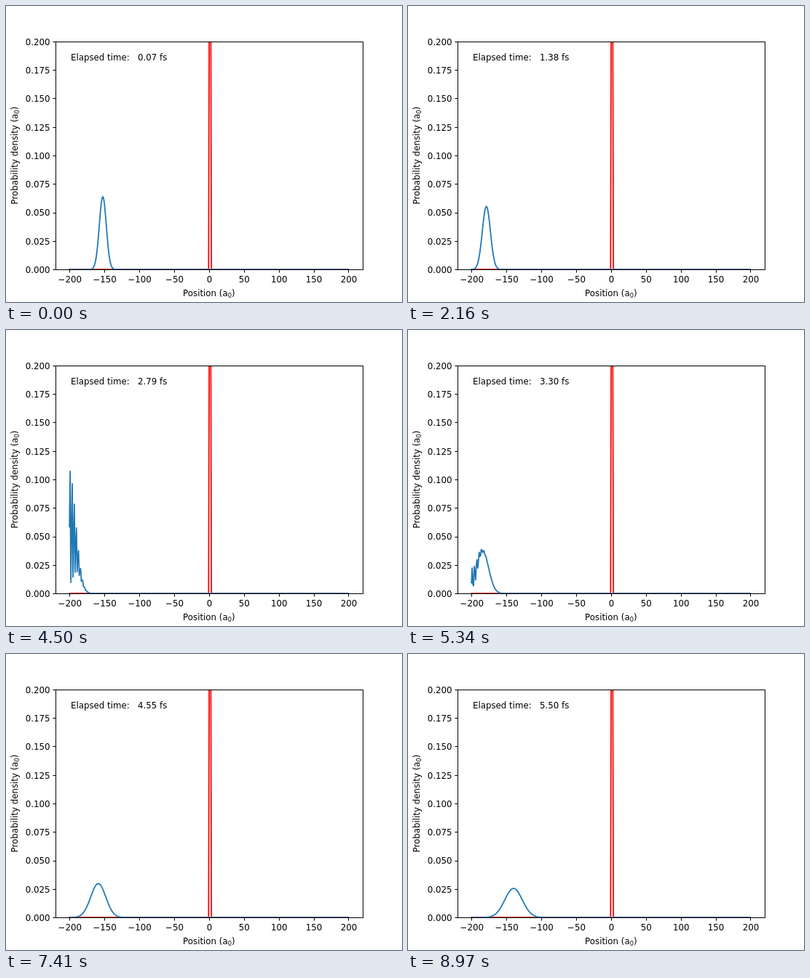
Animation, 544 px wide and 408 px high, one loop 9000 ms. Source, as an HTML page:

```html
<!DOCTYPE html>
<html lang="en">
<head>
<meta charset="utf-8">
<title>Wave packet at a wall</title>
<style>
  html, body { margin: 0; width: 100%; height: 100%; overflow: hidden; background: #fff; }
  svg { display: block; width: 544px; height: 408px; }
  text { font: 11.8px "DejaVu Sans", sans-serif; white-space: pre; fill: #000; }
  .sub { font-size: 8.26px; }
  .mid { text-anchor: middle; }
  .end { text-anchor: end; }
  .curve { fill: none; stroke-width: 1.77; stroke-linejoin: round; stroke-linecap: square; }
  .axis { fill: none; stroke: #000; stroke-width: 1; }
</style>
</head>
<body>
<svg viewBox="0 0 544 408">
  <clipPath id="plot"><rect x="68" y="49" width="422" height="314.12"/></clipPath>
  <g clip-path="url(#plot)">
    <path id="barrier" class="curve" stroke="#f00"/>
    <path id="density" class="curve" stroke="#1f77b4"/>
  </g>
  <path id="ticks" class="axis"/>
  <rect class="axis" x="68.5" y="49.5" width="422" height="314"/>
  <g id="labels"></g>
  <text class="mid" x="278.8" y="400">Position (a<tspan class="sub" dy="2">0</tspan><tspan dy="-2">)</tspan></text>
  <text class="mid" transform="translate(16 206) rotate(-90)">Probability density (a<tspan class="sub" dy="2">0</tspan><tspan dy="-2">)</tspan></text>
  <text id="clock" x="89" y="75"></text>
</svg>
<script>
const $ = id => document.getElementById(id);
const px = x => 278.8 + x * 421.6 / 440;
const py = y => 363.12 - y * 1570.8;
const snap = v => Math.floor(v + 0.5) + 0.5;

const LOOP = 9000, STEP = 30;
const FS = 0.0241888;             // femtoseconds per atomic time unit
const WALL = -200.75, START = -150.73, SPEED = 0.489;
const NORM = 0.802, VAR0 = 25, SPREAD = 0.00257, FRINGE = 4.585;
const grid = Array.from({ length: 400 }, (_, i) => -200 + i * 400 / 399);

const trace = f => "M" + grid.map(x => px(x).toFixed(2) + " " + py(f(x)).toFixed(2)).join("L");

// Incoming Gaussian packet interfering with its mirror image in the wall
function densityAt(t) {
  const variance = VAR0 + SPREAD * t * t;
  const peak = NORM / Math.sqrt(2 * Math.PI * variance);
  const centre = START - SPEED * t;
  const mirror = 2 * WALL - centre;
  const k = FRINGE * (SPEED - SPREAD * t / variance * (WALL - centre));
  const packet = d => peak * Math.exp(-d * d / (2 * variance));
  return x => {
    const a = packet(x - centre);
    const b = packet(x - mirror);
    return a + b - 2 * Math.sqrt(a * b) * Math.cos(k * (x - WALL));
  };
}

function label(text, x, y, cls) {
  const el = document.createElementNS("http://www.w3.org/2000/svg", "text");
  el.setAttribute("class", cls);
  el.setAttribute("x", x);
  el.setAttribute("y", y);
  el.textContent = text;
  $("labels").append(el);
}

function drawAxes() {
  let d = "";
  for (let v = -200; v <= 200; v += 50) {
    d += `M${snap(px(v))} 363.5v4.1`;
    label(String(v).replace("-", "\u2212"), px(v) + 0.6, 381, "mid");
  }
  for (let i = 0; i <= 8; i++) {
    const y = py(i * 0.025);
    d += `M68.5 ${snap(y)}h-4.1`;
    label((i * 0.025).toFixed(3), 60.5, Math.round(y + 4.9), "end");
  }
  $("ticks").setAttribute("d", d);
  $("barrier").setAttribute("d", trace(x => x > 0 && x < 3 ? 0.25 : 0));
}

let shown = -1;
function draw() {
  const step = Math.floor(performance.now() % LOOP / STEP);
  if (step !== shown) {
    shown = step;
    const t = 3 + 0.75 * step;
    $("density").setAttribute("d", trace(densityAt(t)));
    $("clock").textContent = `Elapsed time:   ${(t * FS).toFixed(2)} fs`;
  }
  requestAnimationFrame(draw);
}

drawAxes();
draw();
</script>
</body>
</html>
```
